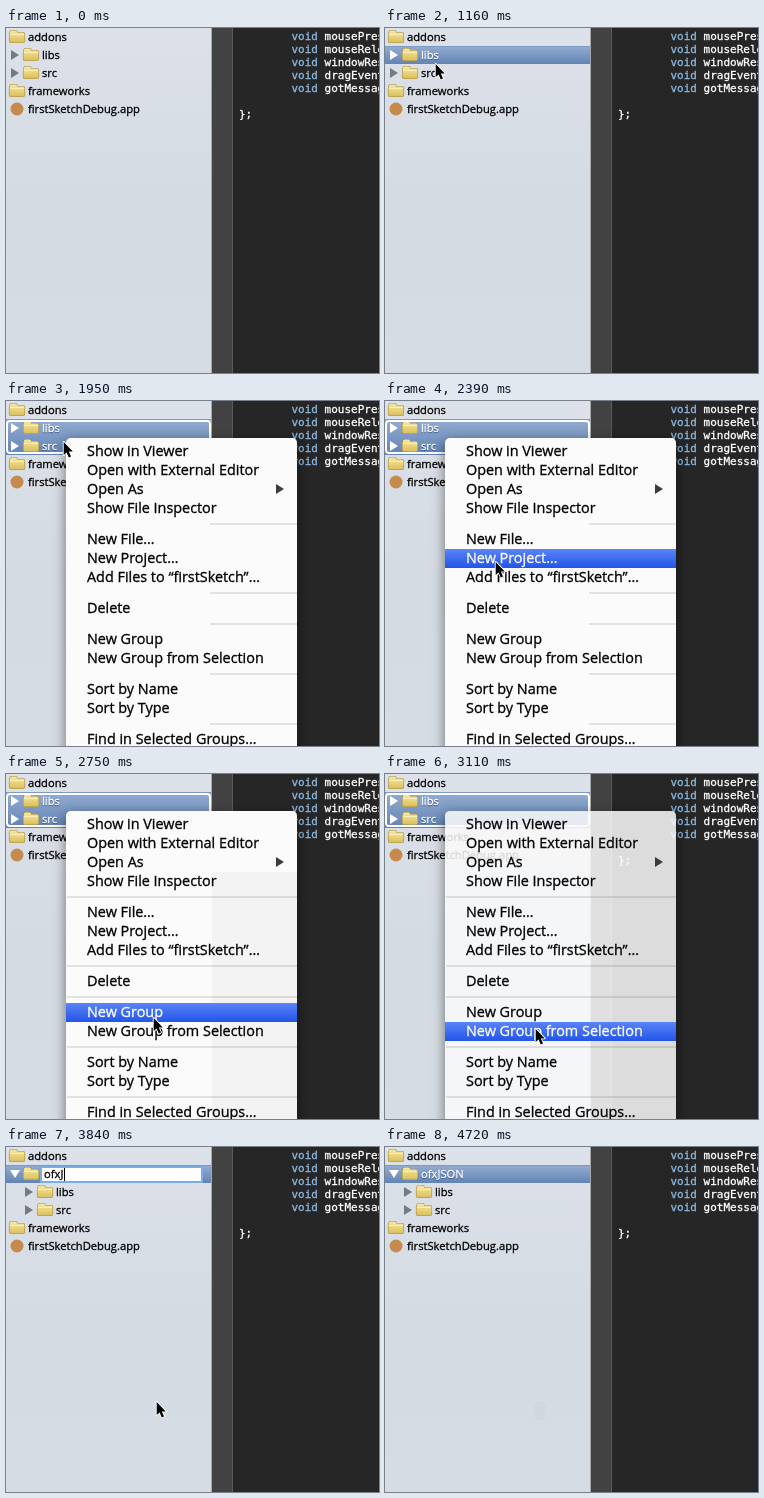
Recreate the animation shown at these times as an HTML page with a canvas. Size 373 by 345 pixels, loop 5.22 s.

```html
<!DOCTYPE html>
<html lang="en">
<head>
<meta charset="utf-8">
<title>Grouping files in a project tree</title>
<style>
  html, body { margin: 0; width: 100%; height: 100%; overflow: hidden; background: #262626; }
  canvas { display: block; width: 373px; height: 345px; }
</style>
</head>
<body>
<canvas id="stage" width="373" height="345"></canvas>
<script>
const ctx = document.getElementById('stage').getContext('2d');
const LOOP = 5220, W = 373, H = 345, PANEL = 205, ROW = 18;
const TREE_FONT = '11.2px "Open Sans", "Noto Sans", sans-serif';
const MENU_FONT = '14.4px "Open Sans", "Noto Sans", sans-serif';
const CODE_FONT = '11px "DejaVu Sans Mono", monospace';
const MENU = { x: 60, y: 37, right: 291 };

// Stepped tracks: each entry starts at its first value, in ms.
const pointer = [
  [100, 87, 7], [220, 74, 13], [330, 60, 21], [450, 52, 26],
  [930, 52, 27], [1050, 51, 31], [1160, 50, 35], [1280, 48, 41], [1400, 47, 46],
  [1750, 57, 40], [2150, 66, 62], [2270, 86, 110], [2390, 110, 160],
  [2510, 131, 204], [2630, 143, 232], [2750, 147, 243], [2870, 149, 252], [2990, 150, 254]
];
const typed = [
  [3340, 'New Group'], [3540, 'o'], [3640, 'of'], [3740, 'ofx'], [3840, 'ofxJ'],
  [3940, 'ofxJS'], [4040, 'ofxJSO'], [4140, 'ofxJSON']
];
const menuItems = [
  [50, 'Show in Viewer'], [69, 'Open with External Editor'], [88, 'Open As'], [107, 'Show File Inspector'],
  [138, 'New File…'], [157, 'New Project…'], [176, 'Add Files to “firstSketch”…'],
  [207, 'Delete'],
  [238, 'New Group'], [257, 'New Group from Selection'],
  [288, 'Sort by Name'], [307, 'Sort by Type'],
  [338, 'Find in Selected Groups…']
];
const separators = [122, 191, 222, 272, 322];
const methods = ['mousePressed', 'mouseReleased', 'windowResized', 'dragEvent', 'gotMessage'];

const at = (track, t) => track.filter(step => step[0] <= t).pop();

function rect(x, y, w, h, fill) {
  ctx.fillStyle = fill;
  ctx.fillRect(x, y, w, h);
}

function shade(y, h, ...colors) {
  const g = ctx.createLinearGradient(0, y, 0, y + h);
  colors.forEach((c, i) => g.addColorStop(i / (colors.length - 1), c));
  return g;
}

// A hairline stroke gives the slightly heavy look of smoothed screen type.
function text(s, x, y, font, color) {
  ctx.font = font;
  ctx.fillStyle = ctx.strokeStyle = color;
  ctx.lineWidth = 0.3;
  ctx.fillText(s, x, y);
  ctx.strokeText(s, x, y);
}

function polygon(points, fill) {
  ctx.beginPath();
  points.forEach(([x, y]) => ctx.lineTo(x, y));
  ctx.closePath();
  ctx.fillStyle = fill;
  ctx.fill();
}

function drawEditor() {
  rect(PANEL, 0, W - PANEL, H, '#262626');
  rect(PANEL, 0, 22, H, '#424242');
  rect(PANEL, 0, 1, H, '#a8a8a8');
  rect(226, 0, 1, H, '#5a5a5a');
  methods.forEach((name, i) => {
    text('void', 285.5, 12 + 13 * i, CODE_FONT, '#8db8de');
    text(name, 318.6, 12 + 13 * i, CODE_FONT, '#fff');
  });
  text('};', 233, 90, CODE_FONT, '#fff');
}

function folder(x, y) {
  ctx.beginPath();
  ctx.roundRect(x + 1, y - 6.5, 7, 5, 1.5);
  ctx.roundRect(x + 0.5, y - 4.5, 15, 10, 1.5);
  ctx.strokeStyle = '#a48b3c';
  ctx.lineWidth = 1.2;
  ctx.stroke();
  ctx.fillStyle = shade(y - 6, 12, '#f5e7a3', '#e8d27a', '#d8bd5b');
  ctx.fill();
  rect(x + 1, y - 3, 14, 1, '#f8eeb9');
}

function triangle(x, y, open, color) {
  polygon(open ? [[x - 1, y - 4], [x + 9, y - 4], [x + 4, y + 4]]
               : [[x, y - 5], [x + 8, y], [x, y + 5]], color);
}

function selectRows(index, count = 1) {
  const y = index * ROW, height = count * ROW;
  rect(0, y, PANEL, height, shade(y, height, '#94add2', '#6284b4'));
  rect(0, y, PANEL, 1, '#7d99c2');
}

function treeRow(index, label, { indent = 0, arrow = '', selected = false, app = false } = {}) {
  const y = index * ROW + 9, x = 3 + indent * 14;
  if (arrow) triangle(x - 12, y, arrow === 'open', selected ? '#fff' : '#747a82');
  if (app) {
    ctx.beginPath();
    ctx.arc(11, y, 6.5, 0, 7);
    ctx.fillStyle = '#c58a4c';
    ctx.fill();
  } else {
    folder(x, y);
  }
  if (selected) text(label, x + 19, y + 5, TREE_FONT, 'rgba(40,65,110,.6)');
  text(label, x + 19, y + 4, TREE_FONT, selected ? '#fff' : '#000');
}

function drawNameField(name, fresh) {
  rect(34, 19, 163, 17, '#79ade6');
  rect(36, 21, 159, 13, '#fff');
  ctx.font = TREE_FONT;
  const width = ctx.measureText(name).width;
  if (fresh) rect(38, 21, width, 13, '#b0d0f8');
  text(name, 38, 31, TREE_FONT, '#000');
  if (!fresh) rect(Math.round(38.5 + width), 21, 1, 13, '#000');
}

function drawTree(t) {
  rect(0, 0, PANEL, H, shade(0, H, '#dde1e9', '#d4dbe3', '#d5dce3'));
  const grouped = t >= 3340, shift = grouped ? 1 : 0;
  const libsSelected = !grouped && t >= 690, srcSelected = !grouped && t >= 1400;
  const child = { indent: 1 + shift, arrow: 'closed' };

  if (grouped || libsSelected) selectRows(1);
  if (srcSelected) {
    if (t < 1520) selectRows(2);
    else selectRows(1, 2);
  }
  treeRow(0, 'addons');
  if (grouped) {
    const editing = t < 4240;
    treeRow(1, editing ? '' : 'ofxJSON', { indent: 1, arrow: 'open', selected: true });
    if (editing) drawNameField(at(typed, t)[1], t < 3540);
  }
  treeRow(1 + shift, 'libs', { ...child, selected: libsSelected });
  treeRow(2 + shift, 'src', { ...child, selected: srcSelected });
  treeRow(3 + shift, 'frameworks');
  treeRow(4 + shift, 'firstSketchDebug.app', { app: true });
  if (t >= 1950 && t < 3220) {
    ctx.beginPath();
    ctx.roundRect(1, 20, 203, 32, 3);
    ctx.strokeStyle = '#fff';
    ctx.lineWidth = 2;
    ctx.stroke();
  }
}

function drawMenu(t, tipY) {
  const { x, y, right } = MENU, width = right - x;
  const settled = t >= 2750, fading = t >= 3110;
  const body = new Path2D(), outside = new Path2D();
  body.roundRect(x, y, width, H, 5);
  outside.rect(0, 0, W, H);
  outside.addPath(body);

  // The shadow falls only outside the translucent body.
  ctx.save();
  ctx.clip(outside, 'evenodd');
  ctx.shadowColor = 'rgba(0,0,0,.5)';
  ctx.shadowBlur = 13;
  ctx.shadowOffsetY = 4;
  ctx.fillStyle = '#fff';
  ctx.fill(body);
  ctx.restore();

  ctx.fillStyle = fading ? 'rgba(251,251,251,.86)' : '#fbfbfb';
  ctx.fill(body);
  if (settled && !fading) rect(206, 98, right - 206, H, '#f3f3f3');
  const lineStart = settled ? x + 1 : 204;
  separators.forEach(lineY => rect(lineStart, lineY, right - lineStart, 2, 'rgba(0,0,0,.1)'));
  menuItems.forEach(([center, label]) => {
    const active = t >= 2150 && Math.abs(tipY - center) <= 9.5;
    if (active) rect(x, center - 9, width, 19, shade(center - 9, 19, '#5b84f7', '#2255e8'));
    text(label, 81, center + 5, MENU_FONT, active ? '#fff' : '#000');
    if (label === 'Open As') triangle(270, center, false, active ? '#fff' : '#3c3c3c');
  });
}

function drawPointer(x, y) {
  ctx.save();
  ctx.translate(x, y);
  const outline = [[0.7, 1], [0.7, 14], [3.6, 11.4], [5.8, 16.4], [8, 15.4], [5.8, 10.6], [9.8, 10.4]];
  polygon(outline, '#000');
  ctx.lineJoin = 'round';
  ctx.strokeStyle = '#fff';
  ctx.lineWidth = 1.8;
  ctx.stroke();
  ctx.fill();
  ctx.restore();
}

function draw(t) {
  const tip = at(pointer, t);
  drawEditor();
  drawTree(t);
  if (t >= 1950 && t < 3220) drawMenu(t, tip[2]);
  if (t >= 4720) {
    ctx.beginPath();
    ctx.roundRect(149, 254, 12, 19, 5);
    ctx.fillStyle = 'rgba(60,70,80,.025)';
    ctx.fill();
  } else if (tip) {
    drawPointer(tip[1], tip[2]);
  }
}

const start = performance.now();
function tick() {
  draw((performance.now() - start) % LOOP);
  requestAnimationFrame(tick);
}
tick();
</script>
</body>
</html>
```
